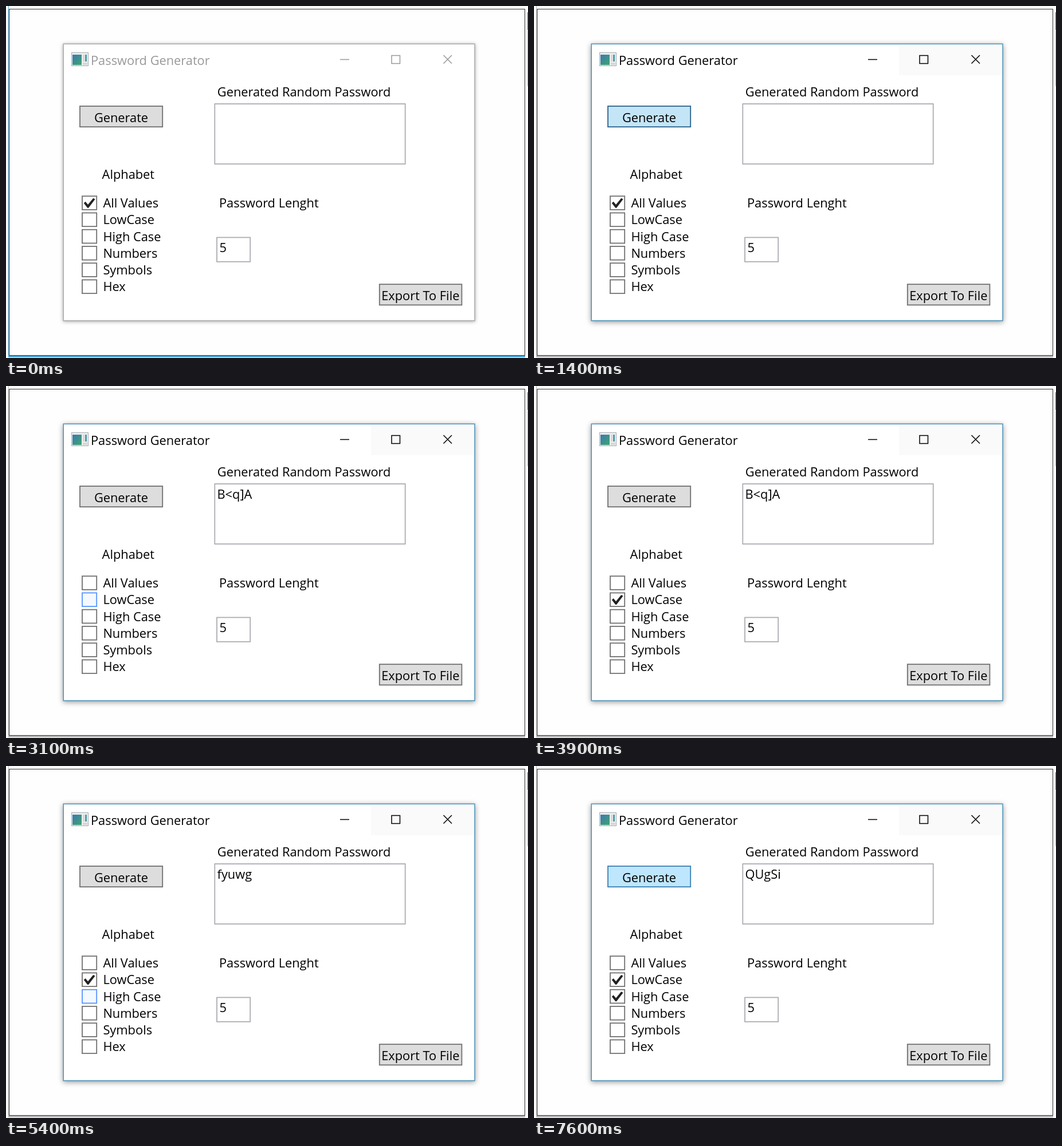
Animation of 911x615 px, one loop 8 s. Source, as an HTML page:

```html
<!DOCTYPE html>
<html lang="en">
<head>
<meta charset="utf-8">
<title>Password Generator</title>
<style>
  html, body { margin: 0; width: 100%; height: 100%; overflow: hidden; background: #fdfdfd; }
  svg { display: block; width: 911px; height: 615px; }
  text { font: 21.8px "Open Sans", "Noto Sans", sans-serif; fill: #000; }
  .middle { text-anchor: middle; }
  .control { stroke: #707070; stroke-width: 1.8; fill: #ddd; }
  .box { fill: #fff; }
  .field { fill: #fff; stroke: #abadb3; }
  .button.hover { fill: #bee6fd; stroke: #3c7fb1; }
  .button.pressed { fill: #c4e5f6; stroke: #2c628b; }
  .box.hover { fill: #f3f9ff; stroke: #5593ff; }
  .box.pressed { fill: #d9ecff; stroke: #3c77dd; }
  .field.hover { stroke: #7eb4ea; }
  .tick { fill: #212121; }
  #frame { fill: #fff; stroke: #4b92b8; stroke-width: 1.5; filter: drop-shadow(0 2px 5px #0006); }
  #glyphs { fill: none; stroke: #000; stroke-width: 1.5; }
  .inactive #frame { stroke: #aaa; filter: drop-shadow(0 1px 3px #0005); }
  .inactive #glyphs { stroke: #999; }
  .inactive #glyphs.hover { stroke: #777; }
  .inactive #title { fill: #999; }
  #edge { fill: #b9b9b9; }
  .inactive #edge { fill: #4fa8dc; }
</style>
</head>
<body>
<svg id="stage" viewBox="0 0 911 615">
  <defs>
    <linearGradient id="picture" x2="1" y2="1">
      <stop stop-color="#3c78b4"/><stop offset="1" stop-color="#3fa56b"/>
    </linearGradient>
  </defs>
  <rect width="911" height="615" fill="#fdfdfd"/>
  <path id="edge" d="M4 0H5V611H906V614H4Z"/>
  <rect x="5.5" y="5.5" width="900" height="605" fill="#fefefe" stroke="#333"/>
  <path d="M910.5 43V140" stroke="#bbb"/>
  <path d="M910.5 11V42" stroke="#2484c6"/>

  <rect id="frame" x="100.2" y="66.3" width="717.8" height="483.5"/>
  <path id="caption" d="M637 68H817V121H637Z" fill="#fafafa"/>
  <g>
    <rect x="114.5" y="81.5" width="29" height="23" fill="#eee" stroke="#a5a9ad"/>
    <rect x="116" y="85" width="16" height="18" fill="url(#picture)"/>
    <path d="M134 85H137V97H134Z" fill="#d5d8da"/>
    <path d="M138 85H141V97H138Z" fill="#4f9aa5"/>
    <path d="M134 99H142V103H134Z" fill="#d5d8da"/>
  </g>
  <text id="title" x="148" y="103">Password Generator</text>
  <path id="glyphs" d="M583 93.5H599M673 86.5H687.5V100.5H673ZM763.5 86L778 100.5M778 86L763.5 100.5"/>

  <rect id="generate" class="control button" x="129" y="175" width="144.2" height="36.2"/>
  <text class="middle" x="201" y="203">Generate</text>
  <text x="368.8" y="158">Generated Random Password</text>
  <rect id="output" class="control field" x="364.3" y="171" width="332.4" height="105"/>
  <text id="password" x="368.5" y="197"></text>
  <text x="167.6" y="302">Alphabet</text>
  <g id="options"></g>
  <text x="372" y="352">Password Lenght</text>
  <rect class="control field" x="368" y="404.4" width="58.2" height="42.4"/>
  <text x="372.5" y="430">5</text>
  <rect class="control button" x="651.8" y="486.2" width="143.6" height="36.2"/>
  <text class="middle" x="723.3" y="514">Export To File</text>
</svg>
<script>
const LOOP = 8000;
const byId = id => document.getElementById(id);
const labels = ["All Values", "LowCase", "High Case", "Numbers", "Symbols", "Hex"];

byId("options").innerHTML = labels.map((label, i) => `
  <g transform="translate(132 ${331.2 + i * 29.25})">
    <rect class="control box" x="1" y="1" width="25.2" height="23.7"/>
    <path class="tick" d="M3.8 13.2L6.6 10.6L11 15.8L20.2 4.6L23.6 6.3L12 21.6H10.2Z"/>
    <text x="37.4" y="21">${label}</text>
  </g>`).join("");
const boxes = [...document.querySelectorAll(".box")];
const ticks = [...document.querySelectorAll(".tick")];

// Pointer history: start time, element under the pointer, its state.
const pointer = [
  [0], [200, "output", "hover"], [300],
  [500, "generate", "hover"], [600],
  [1000, "generate", "hover"], [1400, "generate", "pressed"], [1600, "generate", "hover"], [1900],
  [2200, 0, "hover"], [2600, 0, "pressed"], [2800, 0, "hover"],
  [3100, 1, "hover"], [3500, 1, "pressed"], [3700, 1, "hover"], [3900],
  [4200, "generate", "hover"], [4500, "generate", "pressed"], [4700, "generate", "hover"], [5100],
  [5200, 0, "hover"], [5300, 1, "hover"],
  [5400, 2, "hover"], [6200, 2, "pressed"], [6400, 2, "hover"],
  [6700, 1, "hover"], [6800],
  [7100, "generate", "hover"], [7400, "generate", "pressed"], [7600, "generate", "hover"]
];
const passwords = [[0, ""], [1600, "B<q]A"], [4700, "fyuwg"], [7600, "QUgSi"]];
const latest = (list, t) => list.findLast(([start]) => start <= t);

function setState(element, state) {
  element.classList.toggle("hover", state === "hover");
  element.classList.toggle("pressed", state === "pressed");
}

function render(t) {
  const [, target, state] = latest(pointer, t);
  for (const id of ["generate", "output"]) setState(byId(id), target === id && state);
  boxes.forEach((box, i) => setState(box, target === i && state));

  const checked = [t < 2800, t >= 3700, t >= 6400];
  ticks.forEach((tick, i) => tick.style.display = checked[i] ? "" : "none");

  byId("password").textContent = latest(passwords, t)[1];
  byId("stage").classList.toggle("inactive", t < 1400);
  byId("caption").style.display = t < 200 ? "none" : "";
  setState(byId("glyphs"), t >= 200 && t < 300 && "hover");
}

const origin = performance.now();
function tick() {
  render((performance.now() - origin) % LOOP);
  requestAnimationFrame(tick);
}
tick();
</script>
</body>
</html>
```
